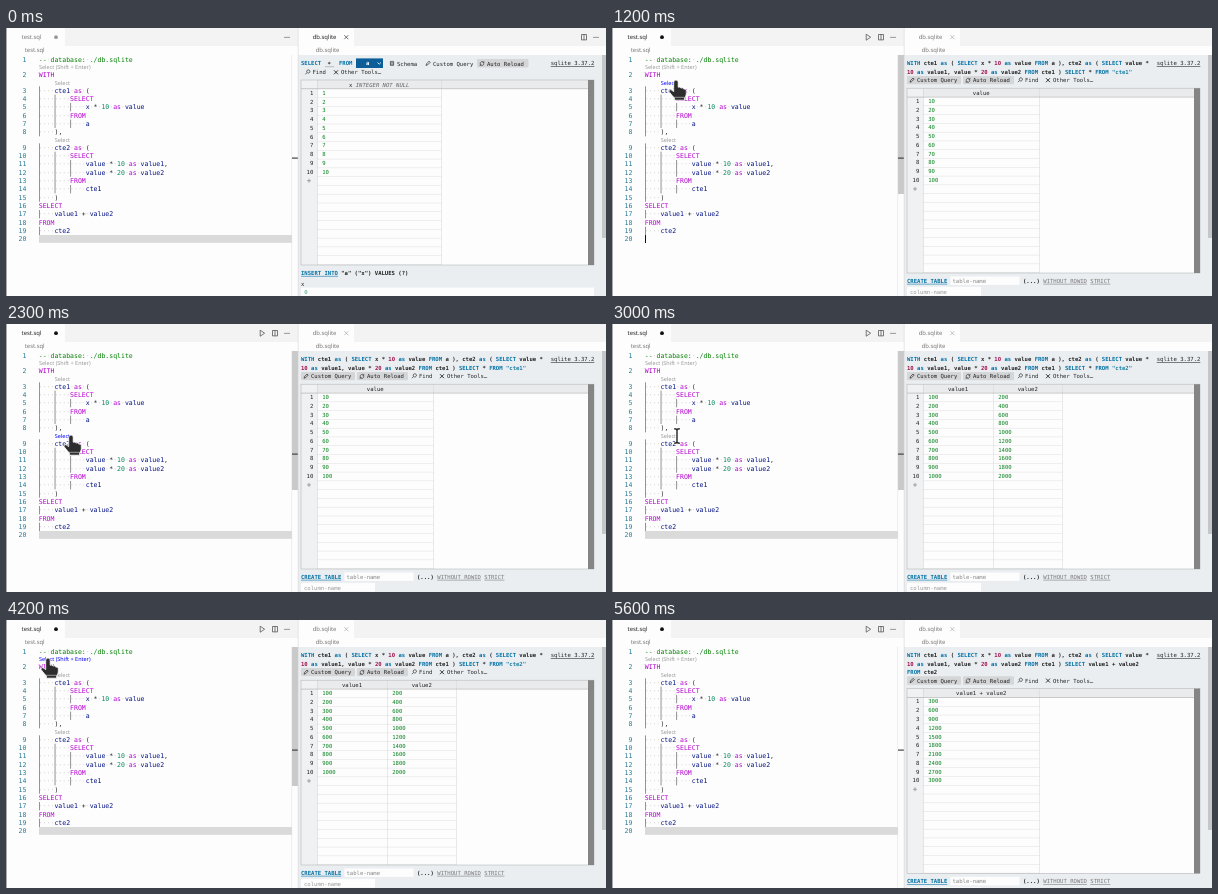
Recreate the animation shown at these times as an HTML page. Size 600x268 px, loop 5.7 s.

```html
<!DOCTYPE html>
<html lang="en">
<head>
<meta charset="utf-8">
<title>SQL editor with live query results</title>
<style>
html, body { margin: 0; width: 100%; height: 100%; overflow: hidden; background: #fdfdfd; }
svg { display: block; width: 600px; height: 268px; }
text { white-space: pre; text-rendering: geometricPrecision; }
.code { font: 6.51px "DejaVu Sans Mono", monospace; }
.mono { font: 5.58px "DejaVu Sans Mono", monospace; }
.bold { font-weight: bold; }
.ui { font: 5.9px "Noto Sans", sans-serif; }
.lens { font: 5.5px "Noto Sans", sans-serif; fill: #999; }
.lens.on { fill: #0000ff; }
.link { text-decoration: underline; }
</style>
</head>
<body>
<svg id="stage" viewBox="0 0 600 268" xmlns="http://www.w3.org/2000/svg"></svg>
<script>
const LOOP = 5700, STEP = 100;
const INK = '#222', BLUE = '#0070a5', GREY = '#777', GREEN = '#098020';

// Drawing helpers return SVG markup; text is placed by its visual middle.
const esc = s => s.replace(/&/g, '&amp;').replace(/</g, '&lt;');
const rect = (x, y, w, h, fill, more = '') =>
  `<rect x="${x}" y="${y}" width="${w}" height="${h}" fill="${fill}" ${more}/>`;
const path = (d, color, width = 0.7, fill = 'none') =>
  `<path d="${d}" stroke="${color}" stroke-width="${width}" fill="${fill}"/>`;
const text = (x, y, s, cls, fill, more = '') =>
  `<text x="${x}" y="${y + 2.1}" class="${cls}" ${fill ? `fill="${fill}"` : ''} ${more}>${s}</text>`;
const span = (s, fill) => `<tspan fill="${fill}">${esc(s)}</tspan>`;
const group = (id, body) => `<g id="${id}">${body}</g>`;

// Editor
const source = `-- database: ./db.sqlite
WITH
    cte1 as (
        SELECT
            x * 10 as value
        FROM
            a
    ),
    cte2 as (
        SELECT
            value * 10 as value1,
            value * 20 as value2
        FROM
            cte1
    )
SELECT
    value1 + value2
FROM
    cte2
`.split('\n');

const lineY = i => 31.5 + i * 8.33 + (i > 0 ? 7.1 : 0) + (i > 1 ? 7.1 : 0) + (i > 7 ? 7.1 : 0);

function codeLine(s) {
  const tokens = s.match(/^--.*|\s+|\w+|[^\w\s]/g) || [];
  return tokens.map(t => {
    if (t.startsWith('--'))
      return t.split(' ').map(p => span(p, '#008000')).join(span('·', '#ccc'));
    if (/^\s/.test(t)) return span('·'.repeat(t.length), '#ccc');
    if (/^(WITH|SELECT|FROM|as)$/.test(t)) return span(t, '#b500d0');
    if (/^\d/.test(t)) return span(t, '#098658');
    return span(t, /^\w/.test(t) ? '#001080' : INK);
  }).join('');
}

function editor() {
  let out = rect(0, 0, 292, 268, '#fdfdfd') + rect(59, 0, 233, 18, '#f3f3f3');
  out += group('lineBand', rect(33, 207, 253, 7.8, '#dadada'));
  out += group('caret', rect(33, 207, 1, 8, '#111'));
  source.forEach((s, i) => {
    const y = lineY(i), depth = s.search(/\S/) / 4;
    out += text(20.3, y + 0.1, i + 1, 'code', '#237893', 'text-anchor="end"');
    out += text(32.8, y + 0.1, codeLine(s), 'code');
    for (let d = 0; d < depth; d++)
      out += rect(33 + d * 15.68, y - 4.1, 0.7, 8.4, '#666');
  });
  out += text(33, 39.2, 'Select (Shift + Enter)', 'lens', '', 'id="lens0"');
  out += text(48.8, 54.6, 'Select', 'lens', '', 'id="lens1"');
  out += text(48.8, 111.7, 'Select', 'lens', '', 'id="lens2"');
  out += text(15.5, 9.2, 'test.sql', 'ui', INK, 'id="leftTab"');
  out += '<circle id="dirty" cx="50" cy="9.2" r="1.9"/>';
  out += text(18.7, 22, 'test.sql', 'ui', GREY) + dots(281);
  out += group('runIcons', path('M254.2 6.2V12.2L258.6 9.2Z', '#444') + splitIcon(269));
  out += group('slider', rect(286, 27, 6, 139, '#c9c9c9'));
  out += rect(285.6, 27, 0.5, 241, '#ddd') + rect(286, 129.5, 6, 1.2, '#444');
  return out + rect(0, 0, 1, 268, '#aaa');
}

function dots(x) {
  return [-2, 0, 2].map(d => `<circle cx="${x + d}" cy="9.3" r="0.6" fill="#444"/>`).join('');
}
const splitIcon = x => path(`M${x - 2.5} 6.5h5v5.4h-5zM${x} 6.5v5.4`, '#444');

// Result panel
const icons = {
  pencil: (x, y) => path(`M${x - 2} ${y + 2}l.5-1.6 2.6-2.6 1.1 1.1-2.6 2.6z`, INK),
  reload: (x, y) => path(`M${x - 1.8} ${y + .6}a2 2 0 0 1 3.4-1.8m.3-1v1.4h-1.4M${x + 1.8} ${y - .2}a2 2 0 0 1-3.4 1.8m-.3 1v-1.4h1.4`, INK, .6),
  find: (x, y) => path(`M${x - 2} ${y + 2}l1.6-1.8a1.6 1.6 0 1 1 .5.4`, INK),
  tools: (x, y) => path(`M${x - 2} ${y + 2}l4-4M${x - 2} ${y - 2}l4 4`, INK, .9),
  schema: (x, y) => path(`M${x - 1.6} ${y - 2}h3.2v4h-3.2zM${x - 1.6} ${y - .6}h3.2M${x - 1.6} ${y + .8}h3.2`, INK, .6)
};
const button = (x, y, icon, label, boxW) =>
  (boxW ? rect(x - 5, y - 4.3, boxW, 8.4, '#d4d6d8', 'rx="1"') : '') +
  icons[icon](x, y) + text(x + 5, y, label, 'mono', INK);

const version = () => text(544.7, 35, 'sqlite 3.37.2', 'mono link', INK);

function sqlLine(y, s) {
  const tokens = s.match(/"\w+"|\w+|\s+|[^\w\s]/g);
  return text(295, y, tokens.map(t => span(t,
    /^(WITH|SELECT|FROM|as)$/.test(t) ? BLUE :
    /^\d/.test(t) ? '#a0104c' :
    t[0] === '"' ? '#1a7fa5' : INK)).join(''), 'mono bold');
}

// cols: right edges with their header markup and the factor that fills the cells
function table(top, bottom, cols) {
  const pitch = 8.78, first = top + 8.6;
  let out = rect(295, top, 287, bottom - top, '#fdfdfd');
  out += rect(295, top, 287, 8.6, '#eaebec') + rect(295, top, 16, bottom - top, '#f0f1f2');
  const end = cols[cols.length - 1].edge;
  for (let y = first + pitch; y < bottom; y += pitch)
    out += rect(311, y, end - 311, 0.5, '#dedede');
  let left = 311;
  cols.forEach(c => {
    out += text((left + c.edge) / 2, top + 4.4, c.head, 'mono', INK, 'text-anchor="middle"');
    out += rect(c.edge, top, 0.5, bottom - top, '#d4d4d4');
    for (let r = 1; r <= 10; r++)
      out += text(left + 5.2, first + (r - .5) * pitch - .3, r * c.step, 'mono', GREEN);
    left = c.edge;
  });
  for (let r = 1; r <= 10; r++)
    out += text(307.3, first + (r - .5) * pitch - .3, r, 'mono', INK, 'text-anchor="end"');
  const plus = first + 10.5 * pitch - .1;
  out += path(`M301 ${plus}h4M303 ${plus - 2}v4`, '#777', .6);
  out += rect(311, top, 0.5, bottom - top, '#ccc') + rect(295, first, 287, 0.5, '#999');
  out += rect(295, top, 293, bottom - top, 'none', 'stroke="#b5b7b9" stroke-width=".6"');
  return out + rect(582, top, 6, bottom - top, '#858585');
}

function startView() {
  let out = text(295, 35.2, 'SELECT', 'mono bold', BLUE) + text(321.5, 35.6, '*', 'mono bold', INK);
  out += rect(319, 38.6, 9, .5, '#888') + text(333, 35.2, 'FROM', 'mono bold', BLUE);
  out += rect(350, 30.4, 27, 9.6, '#0b5e98') + text(360, 35.2, 'a', 'mono bold', '#fff');
  out += path('M371.5 34.5l1.7 1.7 1.7-1.7', '#fff', .8);
  out += button(386, 35.4, 'schema', 'Schema') + button(422, 35.4, 'pencil', 'Custom Query');
  out += button(476, 35.4, 'reload', 'Auto Reload', 51.5) + version();
  out += button(301.5, 44.3, 'find', 'Find') + button(330, 44.3, 'tools', 'Other Tools…');
  const head = 'x <tspan font-style="italic" fill="#666">INTEGER NOT NULL</tspan>';
  out += table(52, 237, [{ edge: 435.5, head, step: 1 }]);
  out += text(295, 244.8, 'INSERT INTO', 'mono bold link', BLUE);
  out += text(335.2, 244.8, '"a" ("x") VALUES (?)', 'mono bold', INK);
  out += text(295, 255.4, 'x', 'mono', INK) + rect(295, 259.6, 293, 9, '#fdfdfd');
  return out + text(298.3, 264.2, '0', 'mono', '#4aa080', 'font-style="italic"');
}

function queryView(tail, cols) {
  const head = 'WITH cte1 as ( SELECT x * 10 as value FROM a ), cte2 as ( SELECT value *';
  const lines = [head, ...tail];
  const shift = (lines.length - 2) * 8.4;
  let out = lines.map((s, i) => sqlLine(35 + i * 8.4, s)).join('') + version();
  const y = 52.2 + shift, foot = 252.7 + shift;
  out += button(300, y, 'pencil', 'Custom Query', 54) + button(356, y, 'reload', 'Auto Reload', 51);
  out += button(408, y, 'find', 'Find') + button(436, y, 'tools', 'Other Tools…');
  out += table(60.2 + shift, 245 + shift, cols);
  out += text(295, foot, 'CREATE TABLE', 'mono bold link', BLUE);
  out += rect(338.5, foot - 4.2, 69, 8.4, '#fdfdfd') + text(340.5, foot, 'table-name', 'mono', '#888');
  out += text(411, foot, '(...)', 'mono bold', INK);
  out += text(431.3, foot, 'WITHOUT ROWID', 'mono link', GREY) + text(478.3, foot, 'STRICT', 'mono link', GREY);
  out += rect(295, foot + 6.2, 74, 8.8, '#fdfdfd');
  return out + text(298, foot + 10.7, 'column-name', 'mono', '#999');
}

function panel() {
  let out = rect(292, 0, 308, 268, '#ebeef1') + rect(292, 0, 308, 18, '#f3f3f3');
  out += rect(292, 0, 56, 18, '#fdfdfd') + rect(292, 18, 308, 9, '#fdfdfd');
  out += rect(291.8, 0, .6, 268, '#d5d5d5');
  out += text(306.7, 9.2, 'db.sqlite', 'ui', INK, 'id="rightTab"');
  out += group('cross', path('M338.3 7.2l4 4M342.3 7.2l-4 4', 'currentColor', .7));
  out += text(309.7, 22, 'db.sqlite', 'ui', GREY);
  out += group('panelIcons', splitIcon(578) + dots(590));
  out += rect(596, 27, 4, 183, '#c4c6c8');
  const nested = name => `10 as value1, value * 20 as value2 FROM cte1 ) SELECT * FROM "${name}"`;
  const pair = [{ edge: 381, head: 'value1', step: 100 }, { edge: 450.5, head: 'value2', step: 200 }];
  out += group('view0', startView());
  out += group('view1', queryView([nested('cte1')], [{ edge: 427.5, head: 'value', step: 10 }]));
  out += group('view2', queryView([nested('cte2')], pair));
  out += group('view3', queryView(
    ['10 as value1, value * 20 as value2 FROM cte1 ) SELECT value1 + value2', 'FROM cte2'],
    [{ edge: 427.5, head: 'value1 + value2', step: 300 }]));
  return out;
}

// Pointers: the hand hangs from its fingertip, the beam is centred
const hand = `<path d="M-2.3 1Q-2 -1 0 -1Q2 -1 2.2 1V6.2Q4 5.6 5 7Q7 6.4 7.8 8Q10 7.6 10.3 9.6V13Q10 15.4 8.6 17V19.2H-1.6V17Q-4 14.6 -7 10.6Q-7.4 8.6 -5.2 8.6L-2.3 10.6Z"
  fill="#2d2d2d" stroke="#fff" stroke-width=".8"/><path d="M-1.8 16.3H8.8" stroke="#ddd" stroke-width=".6"/>`;
const beamShape = 'M-2.8 -7.3Q0 -7.3 0 -5.8Q0 -7.3 2.8 -7.3M0 -6V6M-2.8 7.3Q0 7.3 0 5.8Q0 7.3 2.8 7.3';
const beam = path(beamShape, '#fff', 2.6) + path(beamShape, '#222', 1.4);

document.getElementById('stage').innerHTML =
  editor() + panel() + group('hand', hand) + group('beam', beam);
const el = id => document.getElementById(id);
const show = (id, on) => el(id).style.display = on ? '' : 'none';

// [time, x, y, shape]; the shape holds until the next row
const moves = [
  [0, 150, 285, ''], [300, 150, 285, 'beam'], [600, 64, 53, 'hand'],
  [1500, 64, 52, 'beam'], [2000, 65, 112, 'hand'], [3000, 65, 112, 'beam'],
  [3500, 49.5, 47.5, 'beam'], [3800, 49.5, 47.5, 'beam'], [4100, 42, 39, 'hand'],
  [4500, 41.5, 48, 'beam'], [4900, 41.5, 48, 'beam'], [5400, 150, 285, ''], [LOOP, 150, 285, '']
];
const ease = k => k * k * (3 - 2 * k);

function pointerAt(t) {
  const i = moves.findIndex((m, n) => t < moves[n + 1][0]);
  const [t0, x0, y0, shape] = moves[i], [t1, x1, y1] = moves[i + 1];
  const k = shape === 'hand' ? 0 : ease((t - t0) / (t1 - t0));
  return { x: x0 + (x1 - x0) * k, y: y0 + (y1 - y0) * k, shape };
}

function draw(t) {
  const view = t < 1000 ? 0 : t < 2700 ? 1 : t < 4400 ? 2 : 3;
  for (let i = 0; i < 4; i++) show('view' + i, i === view);

  const focused = view > 0, blank = t >= 1000 && t < 1500;
  show('lineBand', !blank);
  show('caret', blank);
  show('runIcons', focused);
  show('panelIcons', !focused);
  el('leftTab').setAttribute('fill', focused ? INK : GREY);
  el('dirty').setAttribute('fill', focused ? '#111' : '#999');
  el('rightTab').setAttribute('fill', focused ? GREY : INK);
  el('cross').style.color = focused ? '#aaa' : '#333';

  const p = pointerAt(t);
  show('slider', p.shape);
  for (const id of ['hand', 'beam']) {
    show(id, p.shape === id);
    el(id).setAttribute('transform', `translate(${p.x} ${p.y})`);
  }
  const hovered = p.shape !== 'hand' ? -1 : p.y < 45 ? 0 : p.y < 80 ? 1 : 2;
  for (let i = 0; i < 3; i++) el('lens' + i).classList.toggle('on', i === hovered);
}

const start = performance.now();
function tick() {
  const t = Math.max(0, performance.now() - start) % LOOP;
  draw(Math.floor(t / STEP) * STEP);
  requestAnimationFrame(tick);
}
tick();
</script>
</body>
</html>
```
